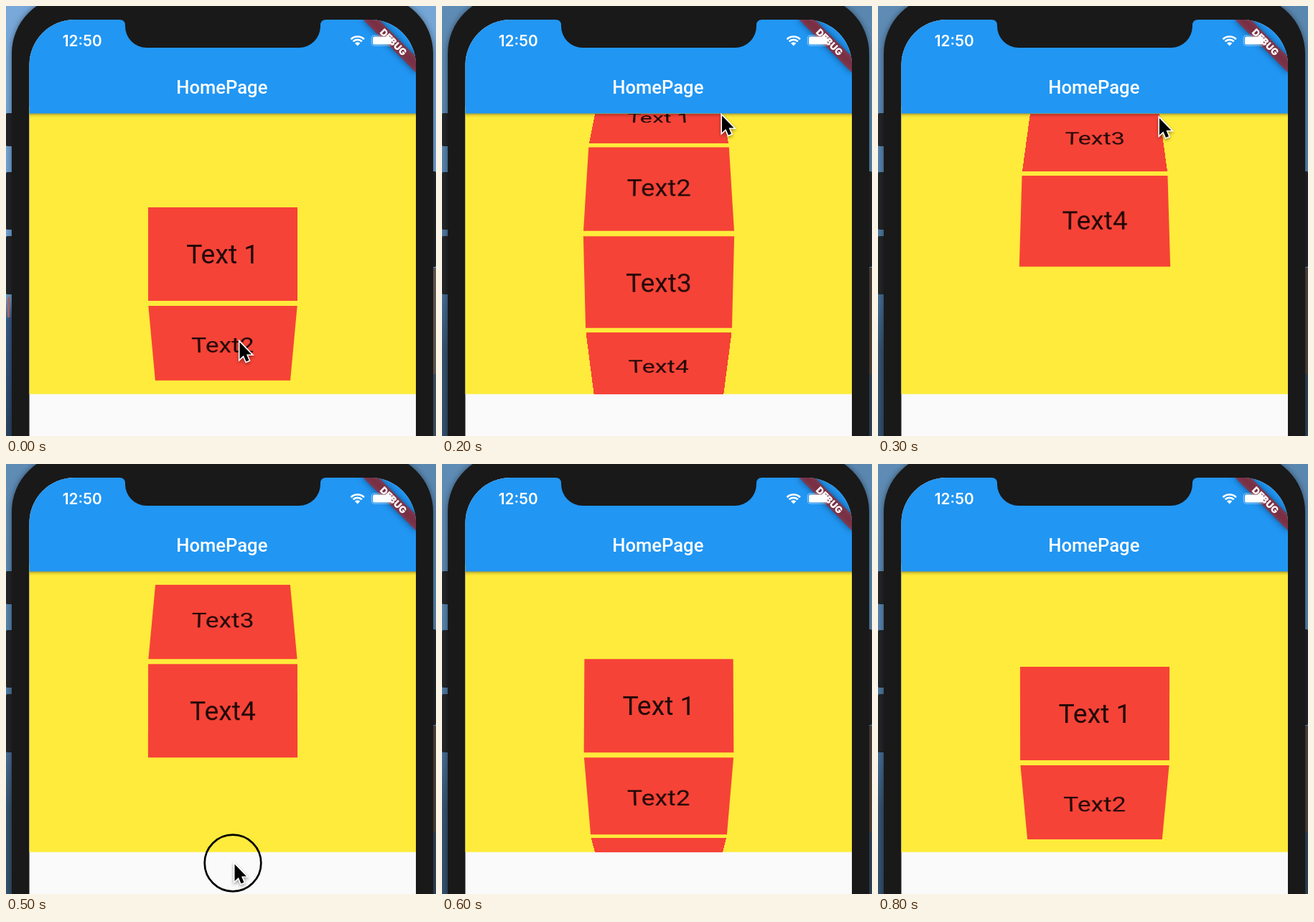
Recreate the animation shown at these times as an HTML page with a canvas. Size 599 px wide and 598 px high, loop 900 ms.

```html
<!DOCTYPE html>
<html lang="en">
<head>
<meta charset="utf-8">
<title>Wheel list</title>
<style>
  html, body { margin: 0; width: 100%; height: 100%; overflow: hidden; background: #191919; }
  canvas { position: absolute; left: 0; top: 0; }
  #wheel {
    position: absolute; left: 32px; top: 149.5px; width: 539.5px; height: 390px;
    overflow: hidden; perspective: 433.33px;
  }
  .item {
    position: absolute; left: 165.75px; top: 130px; width: 208px; height: 130px;
    background: #f64337; color: rgba(0, 0, 0, .87);
    font: 400 37.3px/130px Roboto, sans-serif; text-align: center; white-space: pre;
  }
</style>
</head>
<body>
<canvas id="back" width="599" height="598"></canvas>
<div id="wheel"></div>
<canvas id="front" width="599" height="598"></canvas>
<script>
const W = 599, H = 598, STEP = 100;
const back = document.getElementById('back').getContext('2d');
const front = document.getElementById('front').getContext('2d');
const wheel = document.getElementById('wheel');

// Wheel geometry: lengths in points, SCALE pixels each
const SCALE = 1.3, EXTENT = 100, VIEW = 300, RADIUS = 300;
const TURN = Math.PI / 3 / VIEW;

// One pose per step: scroll offset, pointer tip, pressed
const poses = [
  { scroll: 0, tip: [325.5, 467.5] },
  { scroll: 60, tip: [355, 328] },
  { scroll: 170.4, tip: [390, 152.5] },
  { scroll: 334.8, tip: [392, 156] },
  { scroll: 308, tip: [353, 368] },
  { scroll: 301.3, tip: [318.5, 556.5], pressed: true },
  { scroll: 6.6 },
  { scroll: -12 },
  { scroll: -1.5 }
];

const items = ['Text 1', 'Text2', 'Text3', 'Text4'].map(label => {
  const el = document.createElement('div');
  el.className = 'item';
  el.textContent = label;
  wheel.append(el);
  return el;
});

function rect(c, color, x, y, w, h) {
  c.fillStyle = color;
  c.fillRect(x, y, w, h);
}

function round(c, color, x, y, w, h, r) {
  c.fillStyle = color;
  c.beginPath();
  c.roundRect(x, y, w, h, r);
  c.fill();
}

function fade(c, y0, y1, stops) {
  const g = c.createLinearGradient(0, y0, 0, y1);
  stops.forEach(([at, color]) => g.addColorStop(at, color));
  return g;
}

function drawDesktop(bright) {
  const left = bright
    ? [[0, '#78a9da'], [.55, '#6f9fcf'], [.68, '#6d97bf'], [.73, '#355a86'], [1, '#2a4364']]
    : [[0, '#5f8cb5'], [.4, '#5583ac'], [.68, '#456b92'], [.8, '#36536f'], [1, '#33506c']];
  const right = bright ? '#75a6d6' : '#5a87b0';
  rect(back, fade(back, 0, H, left), 0, 0, 300, H);
  rect(back, right, 300, 0, 299, 364);
  rect(back, bright ? '#6b6059' : '#50443d', 300, 364, 299, 148);
  rect(back, bright ? '#43566d' : '#33465a', 300, 512, 299, 86);
  if (bright) rect(back, '#b5686a', 2, 405, 3, 28);
}

function drawBody() {
  for (const [y, h] of [[149, 46], [231, 80], [320, 81]]) round(back, '#232527', 0, y, 12, h, 2);
  round(back, '#232527', 590, 230, 9, 133, 2);
  back.save();
  back.shadowColor = 'rgba(0,0,0,.45)';
  back.shadowBlur = 8;
  round(back, '#191919', 8, -14, 587, 800, 80);
  back.restore();
}

function drawNotch() {
  back.fillStyle = '#191919';
  back.beginPath();
  back.moveTo(158, 18);
  back.lineTo(158, 19);
  back.quadraticCurveTo(166, 19, 166, 27);
  back.arcTo(166, 58, 197, 58, 30);
  back.arcTo(438, 58, 438, 27, 30);
  back.lineTo(438, 27);
  back.quadraticCurveTo(438, 19, 446, 19);
  back.lineTo(446, 18);
  back.fill();
}

function drawBanner() {
  back.save();
  back.translate(571, 19);
  back.rotate(Math.PI / 4);
  back.filter = 'blur(5px)';
  rect(back, 'rgba(0,0,0,.5)', -52, 36.4, 104, 15.6);
  back.filter = 'none';
  rect(back, 'rgba(183,28,28,.627)', -52, 36.4, 104, 15.6);
  back.fillStyle = '#fff';
  back.font = '900 13.3px Inter, sans-serif';
  back.textAlign = 'center';
  back.fillText('DEBUG', 0, 49);
  back.restore();
}

function drawStatus() {
  back.fillStyle = '#fff';
  back.textAlign = 'center';
  back.font = '600 20.8px Inter, sans-serif';
  back.fillText('12:50', 106.2, 56);
  back.font = '500 25.6px Roboto, sans-serif';
  back.fillText('HomePage', 300.8, 122);

  // Signal fan
  const fan = r => back.arc(489.7, 55.5, r, -Math.PI * .75, -Math.PI * .25);
  back.strokeStyle = '#fff';
  back.lineWidth = 2.7;
  for (const r of [8.6, 13]) {
    back.beginPath();
    fan(r);
    back.stroke();
  }
  back.beginPath();
  back.moveTo(489.7, 55.5);
  fan(5.2);
  back.fill();

  // Battery
  back.strokeStyle = 'rgba(255,255,255,.4)';
  back.lineWidth = 1.3;
  back.beginPath();
  back.roundRect(509.3, 40.8, 29.5, 14.4, 4);
  back.stroke();
  round(back, '#fff', 511, 42.4, 26, 11.2, 2.6);
  round(back, 'rgba(255,255,255,.4)', 540, 45.5, 1.8, 5, 1);
}

function drawPhone(bright) {
  drawDesktop(bright);
  drawBody();
  back.save();
  back.beginPath();
  back.roundRect(32.5, 19, 538.5, 700, 63);
  back.clip();
  rect(back, '#fafafa', 0, 0, W, H);
  rect(back, '#ffeb3b', 0, 140, W, 399.7);
  rect(back, '#2196f3', 0, 0, W, 149.5);
  drawBanner();
  back.restore();
  drawNotch();
  drawStatus();
}

function drawPointer([x, y]) {
  const shape = [[0, 0], [0, 23.5], [5.4, 18.5], [9, 27], [13, 25.3], [9.5, 17], [16.5, 17]];
  front.save();
  front.translate(x, y);
  front.beginPath();
  shape.forEach(p => front.lineTo(...p));
  front.closePath();
  front.lineWidth = 3.2;
  front.strokeStyle = '#fff';
  front.shadowColor = 'rgba(0,0,0,.4)';
  front.shadowBlur = 4;
  front.shadowOffsetY = 2;
  front.stroke();
  front.shadowColor = 'transparent';
  front.fillStyle = '#000';
  front.fill();
  front.restore();
}

function drawFront({ tip, pressed }) {
  front.clearRect(0, 0, W, H);
  const shadow = [[0, 'rgba(0,0,0,.32)'], [.4, 'rgba(0,0,0,.13)'], [1, 'rgba(0,0,0,0)']];
  rect(front, fade(front, 149.5, 155, shadow), 32.5, 149.5, 538.5, 6);
  if (pressed) {
    front.strokeStyle = '#000';
    front.lineWidth = 2.7;
    front.beginPath();
    front.arc(316, 555, 39.3, 0, Math.PI * 2);
    front.stroke();
  }
  if (tip) drawPointer(tip);
}

function turnWheel(scroll) {
  const r = RADIUS * SCALE;
  items.forEach((el, i) => {
    const d = i * EXTENT - scroll;
    el.style.display = Math.abs(d) < (VIEW + EXTENT) / 2 ? 'block' : 'none';
    el.style.transform = `translateZ(${-r}px) rotateX(${-d * TURN}rad) translateZ(${r}px)`;
  });
}

const start = performance.now();
let shown = -1;

function tick() {
  const step = Math.floor((performance.now() - start) / STEP) % poses.length;
  if (step !== shown) {
    shown = step;
    drawPhone(step === 0);
    turnWheel(poses[step].scroll);
    drawFront(poses[step]);
  }
  requestAnimationFrame(tick);
}
tick();
</script>
</body>
</html>
```
